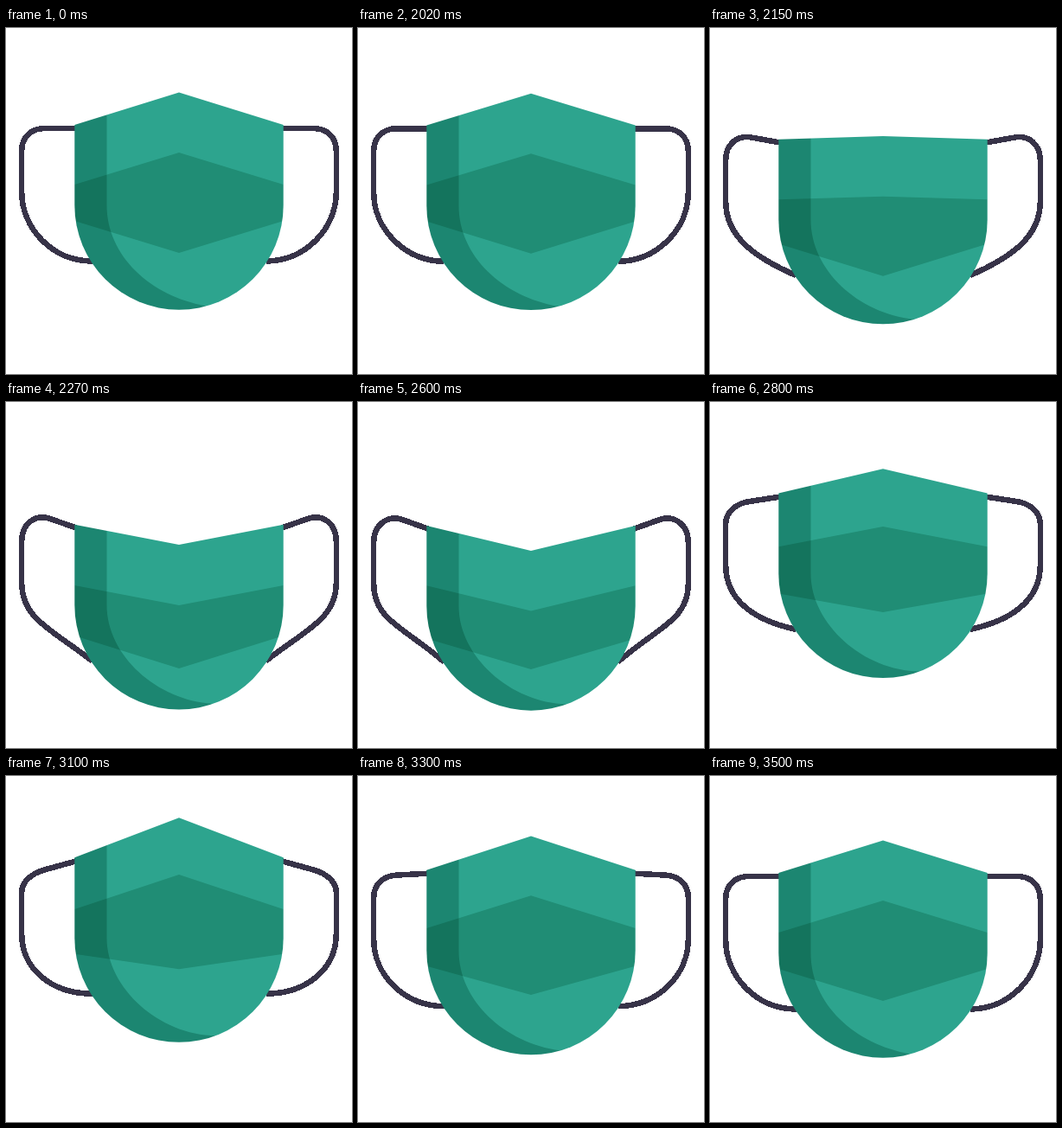
These frames come from a looping animation (400 px wide and 400 px high, 3520 ms). An HTML page:

```html
<!DOCTYPE html>
<html lang="en">
<head>
<meta charset="utf-8">
<title>Breathing mask</title>
<style>
  html, body { margin: 0; width: 100%; height: 100%; overflow: hidden; background: #fff; }
  svg { display: block; width: 100vw; height: 100vh; }
  .strap { fill: none; stroke: #373348; stroke-width: 6.5; shape-rendering: crispEdges; }
  .cloth { fill: #2da48e; }
  .band { fill: #208d75; }
  .shade { fill: #9cd1ca; mix-blend-mode: multiply; }
</style>
</head>
<body>
<svg viewBox="0 0 400 400">
  <clipPath id="outline"><path data-part="outline"/></clipPath>
  <path class="strap" data-part="strap"/>
  <path class="strap" data-part="strap" transform="matrix(-1 0 0 1 400 0)"/>
  <g clip-path="url(#outline)">
    <rect class="cloth" width="400" height="400"/>
    <path class="band" data-part="band"/>
    <path class="shade" data-part="shade"/>
  </g>
</svg>
<script>
const LOOP = 3520;
const MID = 200, RADIUS = 120.7, LEFT = MID - RADIUS, RIGHT = MID + RADIUS;
const FOLD = 116.5, EAR = 18.2;

// y: height of the top corners; head: bend of the top edge;
// band, hem: side height and bend of the dark stripe's edges;
// knee: upper strap point; tail: slant of the strap's lower end; tip: x where the shade ends
const rest = { y: 112, head: -37.5, band: [181, -37], hem: [223, 37], knee: [45, 116], tail: 0, tip: 232 };
const inhale = { y: 149.5, head: 39, band: [220, 38.5], hem: [282.5, 38], knee: [53, 140], tail: 45, tip: 241 };
const exhale = { y: 93.5, head: -46.3, band: [153, -40], hem: [205, 17], knee: [45, 108], tail: 0, tip: 243 };

const steps = [[0, rest], [2010, rest], [2540, inhale], [3078, exhale], [3510, rest], [LOOP, rest]];

const chin = pose => pose.y + 93;

// an edge across the mask, bent in the middle
const edge = (side, bend) => `${LEFT} ${side} L${MID} ${side + bend} L${RIGHT} ${side}`;
const edgeBack = (side, bend) => `${RIGHT} ${side} L${MID} ${side + bend} L${LEFT} ${side}`;

const draw = {
  outline: p =>
    `M${edge(p.y, p.head)} L${RIGHT} ${chin(p)} A${RADIUS} ${RADIUS} 0 0 1 ${LEFT} ${chin(p)} Z`,

  band: p => `M${edge(...p.band)} L${edgeBack(...p.hem)} Z`,

  shade(p) {
    const y = chin(p) + Math.sqrt(RADIUS ** 2 - (p.tip - MID) ** 2);
    const bend = `${FOLD} ${chin(p) + 58} ${p.tip - 65} ${y - (243 - p.tip)}`;
    return `M${FOLD} 0 L${FOLD} ${chin(p)} C${bend} ${p.tip} ${y} L${p.tip} 400 L0 400 L0 0 Z`;
  },

  strap(p) {
    const [x, y] = p.knee, start = p.y + 4, end = chin(p) + 64.5;
    const turn = y + 16 * (y - start) / (82 - x);
    return `M82 ${start} L${x} ${y} C${x - 16} ${turn} ${EAR} ${turn + 10} ${EAR} ${y + 26} ` +
      `L${EAR} ${y + 74} C${EAR} ${y + 116} 54 ${end - p.tail} 99.5 ${end}`;
  }
};

for (const el of document.querySelectorAll('[data-part]')) {
  const shape = draw[el.dataset.part];
  el.setAttribute('d', shape(rest));
  el.animate(
    steps.map(([time, pose]) => ({ offset: time / LOOP, easing: 'ease', d: `path("${shape(pose)}")` })),
    { duration: LOOP, iterations: Infinity }
  );
}
</script>
</body>
</html>
```
